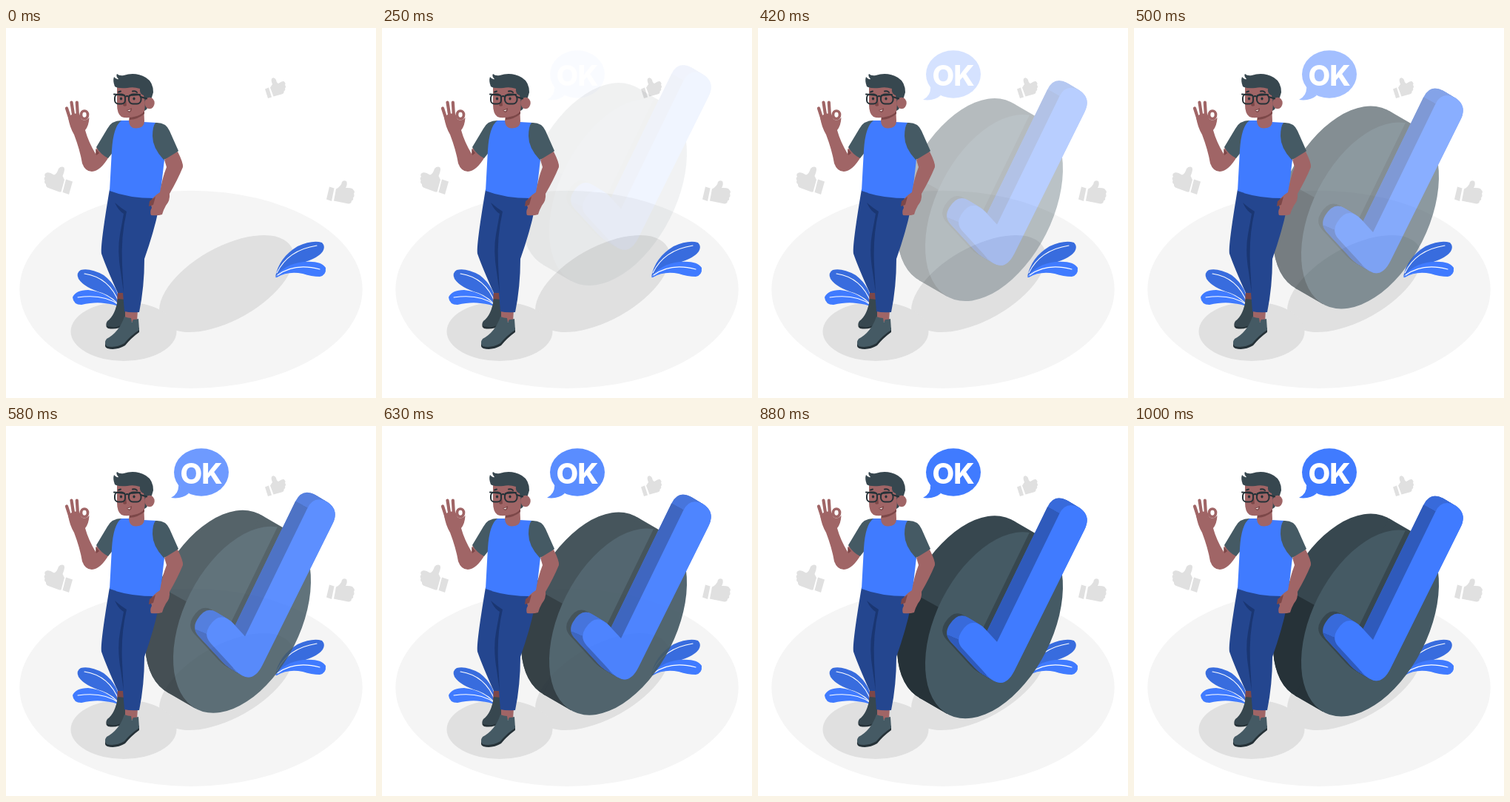
Write an HTML page that moves like this. It is 500x500 px and loops after 1.04 s.

```html
<!DOCTYPE html>
<html lang="en">
<head>
<meta charset="utf-8">
<title>OK</title>
<style>
html, body { margin: 0; width: 100%; height: 100%; overflow: hidden; background: #fff; }
svg { display: block; width: 100vw; height: 100vh; }
.blue { fill: #407bff; }
.leaf { fill: #386cde; }
.vein { fill: none; stroke: #fff; stroke-width: 1.1; stroke-linecap: round; }
.grey { fill: #e0e0e0; }
.skin { fill: #a06566; }
.finger { fill: none; stroke: #a06566; stroke-linecap: round; }
.shade { fill: #7c4748; }
.slate { fill: #455a64; }
.dark { fill: #37474f; }
.ink { fill: #263238; }
.line { fill: none; stroke: #263238; stroke-width: 2; stroke-linecap: round; }
text { font: 800 38.5px Inter, "Open Sans", sans-serif; letter-spacing: -1px; fill: #fff; }
</style>
</head>
<body>
<svg viewBox="0 0 500 500">
  <defs>
    <path id="tick"/>
    <g id="side"></g>
    <g id="rim">
      <ellipse rx="78.6" ry="135.5" transform="translate(281 244.5) rotate(26.8)"/>
      <path d="M344.400 124.800L382.400 146.800L255.600 386.200L217.600 364.200Z"/>
    </g>
    <ellipse id="face" rx="78.6" ry="135.5" transform="translate(319 266.5) rotate(26.8)"/>
    <clipPath id="inFace"><use href="#face"/></clipPath>
    <clipPath id="lowRim"><path d="M150 190L262 252V420H150Z"/></clipPath>
    <clipPath id="lowTick"><path d="M323 300L408 116L385 103L290 280ZM250 277L273 287L320 350H250Z"/></clipPath>
  </defs>

  <!-- floor and shadows -->
  <ellipse cx="250" cy="353.3" rx="231.7" ry="133.6" fill="#f5f5f5"/>
  <g class="grey">
    <ellipse rx="100.7" ry="49.3" transform="translate(298 345.5) rotate(-29.4)"/>
    <ellipse cx="159" cy="410" rx="71.5" ry="40"/>
  </g>

  <!-- thumbs up -->
  <g class="grey">
    <path d="M81 204.500L90 207.500L85 225L76.500 222Z"/>
    <path d="M79 205L76.500 200Q80 192 78.500 188.500Q75 186 71 190Q69 197 65 198.500Q57 193.500 54 196Q51 197.500 53 201Q50.500 203 52.500 206Q51 209 54 211Q53.500 214.500 57 216L72 221.500H74.500Z"/>
    <path d="M350 82.500L355 80.500L359 93.500L354 95Z"/>
    <path d="M357 80.500L360 76Q357.500 70 359.500 68Q362.500 66 365 70Q365.500 74 368 75Q375 70.500 376.500 73Q378.500 75 377 77Q379 79.500 377 81.500Q378 84 375.500 85.500Q376 88.500 372.500 89.500L361.500 92.500Z"/>
    <path d="M437 214.500L443.500 216.500L440 234L433 231.500Z"/>
    <path d="M446 217.500Q453 214 454 208Q456 205 460 207Q462 211 459 216Q469 215.500 469.500 219Q472 221 470 224Q471.500 227 469 229.500Q470 232.500 467 233.500Q467 237.500 462.500 237.500L443 233.500Z"/>
  </g>

  <!-- plants -->
  <path class="leaf" d="M154 376Q153 350 132 334Q114 324 101 327Q94 331 98 339Q106 351 130 358Q146 364 154 376Z"/>
  <path class="blue" d="M154 377Q138 357 111 354Q94 354 90 364Q91 374 102 374Q120 370 133 372Q146 373 154 377Z"/>
  <path class="vein" d="M106 332Q140 337 153 372M97 364Q132 359 152 374"/>
  <path class="leaf" d="M364 336Q369 310 394 295Q414 286 427 290Q432 295 428 302Q420 313 393 319Q375 323 364 336Z"/>
  <path class="blue" d="M364 337Q376 319 402 316Q426 314 432 324Q433 334 424 336Q413 336 401 332Q381 328 366 337Z"/>
  <path class="vein" d="M366 331Q381 300 420 294M367 334Q390 317 424 326"/>

  <g id="disk">
    <use href="#rim" class="dark"/>
    <use href="#rim" class="ink" clip-path="url(#lowRim)"/>
    <use href="#face" class="slate"/>
    <g clip-path="url(#inFace)"><use href="#side" class="dark" x="-6" y="-3"/></g>
    <use href="#side" fill="#386ada"/>
    <g clip-path="url(#lowTick)"><use href="#side" fill="#2f5abb"/></g>
    <use href="#tick" class="blue"/>
  </g>

  <g id="bubble">
    <ellipse class="blue" cx="264" cy="62.500" rx="37" ry="32.300"/>
    <path class="blue" d="M233 80Q234 91 223 97Q238 99 247 91Z"/>
    <text x="263.500" y="77.500" text-anchor="middle">OK</text>
  </g>

  <!-- legs and shoes -->
  <path class="shade" d="M151 356H159V370H150Z"/>
  <path class="ink" d="M136 399Q134 404 138 406Q151 408 158 402V396Z"/>
  <path class="dark" d="M151 366L161 367V390L157 401Q149 406 137 403Q134 400 137 396Q148 388 151 366Z"/>
  <path class="skin" d="M161 382L178 381L177 397H161Z"/>
  <path class="ink" d="M135 424Q132 431 137 433Q149 436 161 429Q169 419 180 411V405Z"/>
  <path class="slate" d="M160 390Q165 392 169 392L170 398L172 394Q176 394 179 393L180 408Q168 416 160 426Q148 433 136 430Q132 425 136 420Q153 411 160 390Z"/>
  <path fill="#24468f" d="M140 218Q165 230 205 226L206 246Q200 275 187 312Q187 350 180 384Q168 385 160 383L158 358H151Q136 325 129 305Q127 295 140 218Z"/>
  <path fill="#1a3672" d="M147 236Q155 243 163 248Q155 282 157 320L159 358L155 330Q150 300 154 279L159 251Q152 247 147 236Z"/>

  <!-- raised arm -->
  <path class="skin" d="M123 160L139 174Q128 193 116 194Q107 194 103 183Q100 165 92 144Q86 134 84 121Q90 114 99 116L102 123Q107 127 112.500 121Q112 132 107 138Q111 153 121 170Z"/>
  <path class="finger" stroke-width="4.200" d="M87 124L82 108.500M91.500 120L88.500 100.500M97 119L95.800 100.500"/>
  <ellipse class="finger" stroke-width="3.700" cx="106" cy="117.300" rx="4.500" ry="5.300"/>
  <path class="shade" d="M121 163L126 169L122 172Z"/>

  <!-- torso -->
  <path class="slate" d="M158 125Q143 124 137 136L122 161Q128 171 138 176L146 166Z"/>
  <path class="blue" d="M156 125H168L186 127L204 128L214 178L208 230Q168 231 140 220L143 165Q145 133 156 125Z"/>
  <path class="slate" d="M202 128Q216 127 221 139L233 166Q225 175 213 178Q198 162 198 146Q198 133 202 128Z"/>
  <path class="skin" d="M214 178L232 167Q240 183 239 188Q232 205 221 224Q222 233 216 240Q213 245 211 252Q205 254 196 253Q194 248 197 243L195 236Q198 228 208 222Q211 203 217 188Z"/>
  <path class="shade" d="M202 228L194 234L193 241L199 239Z"/>

  <!-- head -->
  <path class="skin" d="M167 116L186 104L187 126Q187 135 176 135.500Q167 136 166 126Z"/>
  <path class="shade" d="M167 120Q180 120 187 112V116Q179 123 167 124Z"/>
  <path class="skin" d="M150 76H186L190 97Q191 115 177 119Q163 123 156 120Q150 116 150 103Z"/>
  <path class="dark" d="M147 79Q144 71 146 66Q149 70 152 69Q148 65 150 62Q153 65 159 64Q175 59 189 67Q199 73 199 87L196 97L190 110L187 112Q189 101 186 91Q180 89 181 82Q172 79 164 81Q151 82 147 79Z"/>
  <ellipse class="skin" cx="194" cy="101.500" rx="6.700" ry="7.800"/>
  <path class="shade" d="M162 96L158 104Q159 107 163 105Z"/>
  <path class="line" d="M152 86.500L155 85.500M171 85.500Q175 84.500 177 87"/>
  <ellipse class="ink" cx="155.500" cy="95.500" rx="1.600" ry="2"/>
  <ellipse class="ink" cx="173" cy="95.500" rx="1.600" ry="2"/>
  <rect class="line" x="147" y="89.500" width="14" height="13" rx="5"/>
  <rect class="line" x="166" y="89.500" width="16.500" height="13" rx="5.500"/>
  <path class="line" d="M146 89.500L160 91M161 93Q164 91 166 93M167 91L181 90M182 93L190 95.500"/>
  <path class="shade" d="M163 111Q167 110 170 108Q170 114 166 114Z"/>
  <path d="M164 111.500L168.500 110.200L167 112.500Z" fill="#f3e6e3"/>
</svg>
<script>
const LOOP = 1040, FRAMES = 25;
const $ = id => document.getElementById(id);

// Corners of the tick: x, y, rounding distance.
const corners = [
  [323, 289, 0], [416, 98, 20], [451.5, 116.5, 23],
  [331.5, 358, 34], [267, 288, 14], [289, 252, 28]
];

function roundedPath(points) {
  const toward = ([x, y, d], [u, v]) => {
    const k = d / Math.hypot(u - x, v - y);
    return [x + (u - x) * k, y + (v - y) * k];
  };
  return points.map((p, i) => {
    const n = points.length;
    const from = toward(p, points[(i + n - 1) % n]);
    const to = toward(p, points[(i + 1) % n]);
    return `${i ? "L" : "M"}${from}Q${p[0]},${p[1]} ${to}`;
  }).join("") + "Z";
}

$("tick").setAttribute("d", roundedPath(corners));
// Sweep the tick backwards to give it depth.
$("side").innerHTML = Array.from({ length: 17 }, (_, i) =>
  `<use href="#tick" x="${-i}" y="${-i * 0.6}"/>`).join("");

const drop = [[0, -68], [80, -62], [250, -44.5], [420, -23], [500, -13], [580, -5], [750, 4], [1000, 0], [1040, 0]];
const diskFade = [[0, 0], [80, 0], [250, .07], [420, .37], [500, .61], [580, .84], [700, 1], [1040, 1]];
const bubbleFade = [[0, 0], [80, 0], [250, .025], [420, .22], [500, .48], [580, .75], [710, 1], [1040, 1]];

// Smooth curve through [time, value] keys.
function curve(keys, t) {
  const last = keys.length - 1;
  let i = 0;
  while (i < last - 1 && t >= keys[i + 1][0]) i++;
  const slope = j => {
    if (j === 0 || j === last) return 0;
    const a = keys[j - 1], b = keys[j + 1];
    return (b[1] - a[1]) / (b[0] - a[0]);
  };
  const [t0, a] = keys[i], [t1, b] = keys[i + 1];
  const h = t1 - t0, u = (t - t0) / h, w = 1 - u;
  return a * (1 + 2 * u) * w * w + b * u * u * (3 - 2 * u)
    + h * u * w * (slope(i) * w - slope(i + 1) * u);
}

const clamp = v => Math.max(0, Math.min(1, v));

function draw(now) {
  const frame = Math.floor((now % LOOP) / LOOP * FRAMES + .13) % FRAMES;
  const t = frame * 1000 / 24;
  $("disk").setAttribute("transform", `translate(0 ${curve(drop, t)})`);
  $("disk").setAttribute("opacity", clamp(curve(diskFade, t)));
  $("bubble").setAttribute("opacity", clamp(curve(bubbleFade, t)));
}

const start = performance.now();
function play() {
  draw(performance.now() - start);
  requestAnimationFrame(play);
}
play();
</script>
</body>
</html>
```
